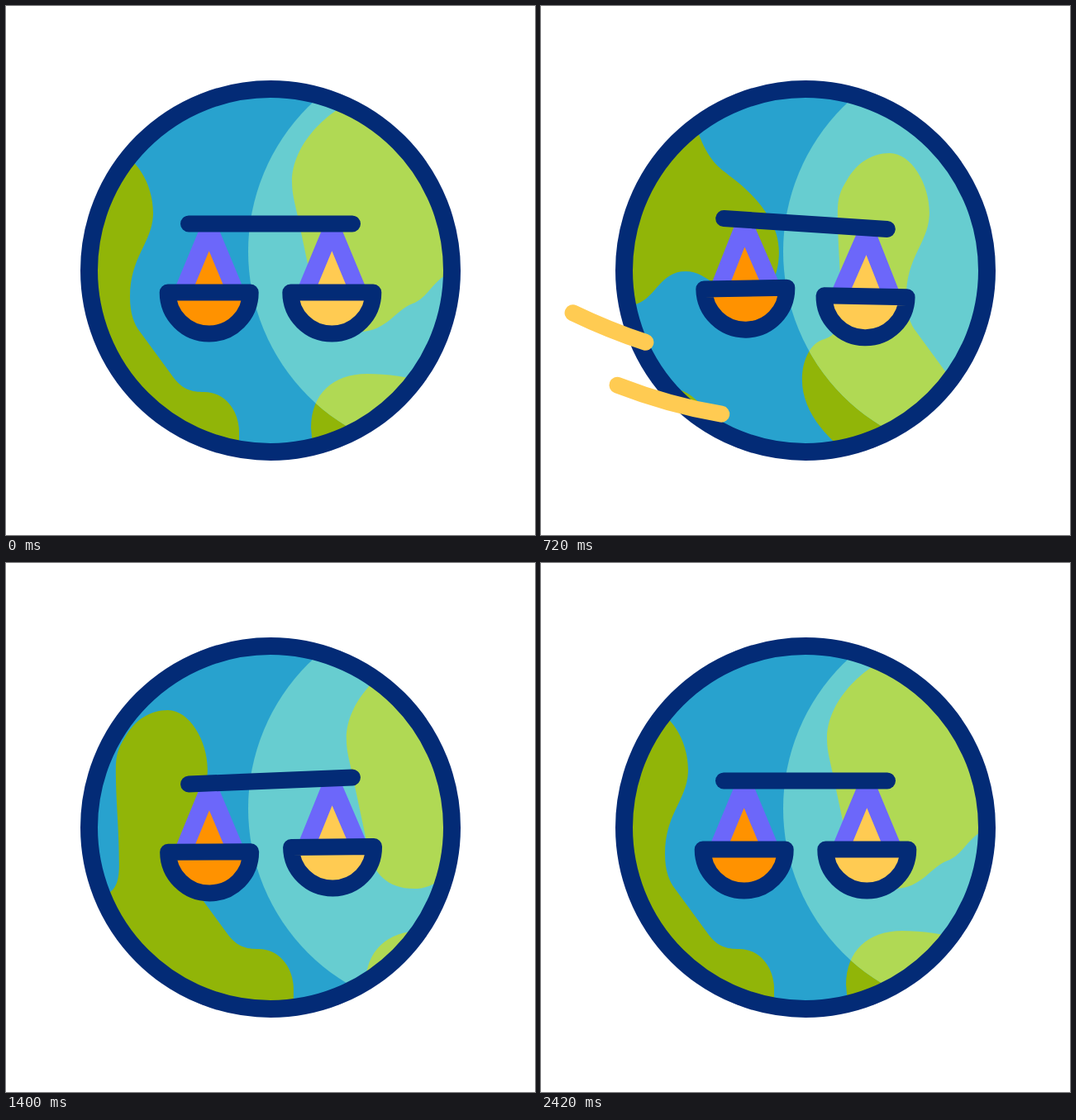
An HTML page that plays this animation: 640x640 px, repeating every 2620 ms.

```html
<!DOCTYPE html>
<html lang="en">
<head>
<meta charset="utf-8">
<title>Balanced world</title>
<style>
  html, body { margin: 0; height: 100%; overflow: hidden; background: #fff; }
  svg { display: block; width: 100vw; height: 100vh; }
</style>
</head>
<body>
<svg viewBox="0 0 640 640" fill="none" stroke-width="20" stroke-linecap="round" stroke-linejoin="round">
  <defs>
    <clipPath id="globe"><circle cx="320" cy="320" r="215"/></clipPath>
    <clipPath id="lit"><circle cx="540" cy="297" r="247"/></clipPath>
    <g id="land">
      <path d="M130 178C156 178 178 215 178 250C178 286 150 302 150 352C150 372 155 385 162 394L203 450C214 464 224 467 240 467C265 467 282 490 282 515V545H166Q156 521 143 521Q132 521 124 534H70C42 510 24 482 24 452C24 426 36 408 48 404C66 399 71 388 71 365C71 320 67 290 67 250C67 232 70 224 78 211C90 190 108 178 130 178Z"/>
      <path d="M440 108C403 115 346 160 346 213C346 228 350 240 353 255L372 345C378 375 395 394 428 394C460 394 472 367 492 360C514 352 520 321 550 321C578 321 592 352 625 352C652 352 663 325 663 298C663 266 643 238 613 213C598 201 590 196 583 187C564 162 565 140 552 130C542 124 530 125 515 121C490 112 465 104 440 108Z"/>
      <path d="M369 510C369 470 395 445 437 445C475 445 515 455 545 465C570 475 586 505 593 529V545H372Z"/>
    </g>
    <g id="world"><use href="#land"/><use href="#land" x="667"/></g>
    <g id="pan">
      <path d="M-32 82.5L0 5.5L32 82.5" stroke="#6c67fa" stroke-width="21"/>
      <path d="M-50 83H50A50 50 0 0 1 -50 83Z" stroke="#032b76"/>
    </g>
  </defs>

  <g clip-path="url(#globe)">
    <path d="M0 0H640V640H0Z" fill="#28a2ce"/>
    <use class="world" href="#world" fill="#91b508"/>
    <g clip-path="url(#lit)">
      <path d="M0 0H640V640H0Z" fill="#67cdd0"/>
      <use class="world" href="#world" fill="#b0d954"/>
    </g>
  </g>
  <circle cx="320" cy="320" r="219.5" stroke="#032b76" stroke-width="21"/>

  <use id="left" href="#pan" fill="#ff9200"/>
  <use id="right" href="#pan" fill="#ffcb52"/>
  <path id="beam" d="M-99 0H99" stroke="#032b76"/>

  <g stroke="#ffcb52">
    <path id="upper" pathLength="1" d="M594 371Q316 505 38 371"/>
    <path id="lower" pathLength="1" d="M594 435Q316 569 38 435"/>
  </g>
</svg>
<script>
const LOOP = 2620, WORLD_WIDTH = 667, SPIN_TIME = 2440;
const $ = id => document.getElementById(id);
const worlds = document.querySelectorAll('.world');
const clamp = x => Math.min(1, Math.max(0, x));
const smooth = x => x * x * (3 - 2 * x);
const progress = (t, from, to) => smooth(clamp((t - from) / (to - from)));

// Bezier ease (.335, 0, .055, 1), solved by bisection
function spinEase(x) {
  let lo = 0, hi = 1;
  for (let i = 0; i < 24; i++) {
    const s = (lo + hi) / 2, r = 1 - s;
    if (3 * r * r * s * .335 + 3 * r * s * s * .055 + s ** 3 < x) lo = s; else hi = s;
  }
  return smooth(lo);
}

// Swings as [time, degrees] turning points
const beamSwing = [[0, 0], [450, -9], [880, 9.2], [1260, -3], [1700, 0]];
const leftSwing = [[0, 0], [450, 4], [900, -3.6], [1250, -.2], [1750, -.5], [2400, 0]];
const rightSwing = [[0, 0], [500, 4.2], [1030, -4.2], [1600, .8], [1950, -.6], [2400, 0]];

function swing(keys, t) {
  const i = keys.findIndex(key => key[0] > t);
  if (i < 0) return keys.at(-1)[1];
  const [t0, a] = keys[i - 1], [t1, b] = keys[i];
  return a + (b - a) * (1 - Math.cos(Math.PI * (t - t0) / (t1 - t0))) / 2;
}

function place(id, x, y, angle) {
  $(id).setAttribute('transform', `translate(${x} ${y}) rotate(${angle})`);
}

function streak(id, head, tail) {
  const line = $(id), length = head - tail;
  line.style.display = length > .002 ? '' : 'none';
  line.setAttribute('stroke-dasharray', `${length} 3`);
  line.setAttribute('stroke-dashoffset', -tail);
}

function draw() {
  const t = performance.now() % LOOP;
  const shift = -WORLD_WIDTH * spinEase(clamp(t / SPIN_TIME));
  worlds.forEach(world => world.setAttribute('x', shift));

  const tilt = swing(beamSwing, t), rad = tilt * Math.PI / 180;
  const dx = 74.3 * Math.cos(rad), dy = 74.3 * Math.sin(rad);
  place('beam', 320, 263.5, tilt);
  place('left', 320 - dx, 263.5 - dy, swing(leftSwing, t));
  place('right', 320 + dx, 263.5 + dy, swing(rightSwing, t));

  streak('upper', progress(t, 0, 735), progress(t, 350, 850));
  streak('lower', progress(t, 0, 900), progress(t, 90, 1115));
  requestAnimationFrame(draw);
}
draw();
</script>
</body>
</html>
```
